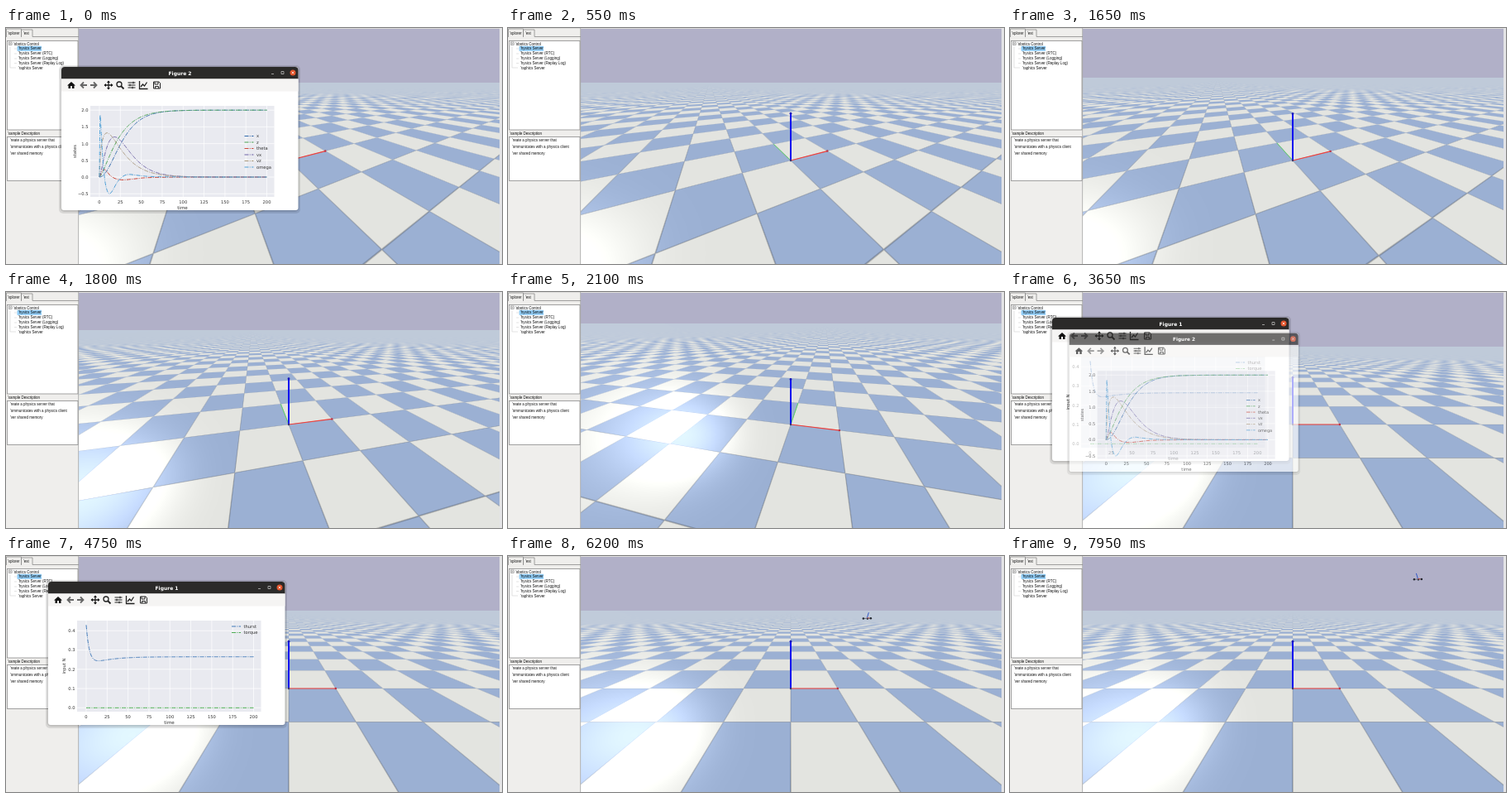
An HTML page with a canvas that plays this animation: 600 px wide and 285 px high, repeating every 8 s.

```html
<!DOCTYPE html>
<html lang="en">
<head>
<meta charset="utf-8">
<title>Drone simulation</title>
<style>
  html, body { margin: 0; width: 100%; height: 100%; overflow: hidden; background: #efeeec; }
  #stage { position: relative; width: 600px; height: 285px; overflow: hidden; }
  canvas, svg { position: absolute; left: 0; top: 0; display: block; }
  .ui { font: 4.5px "Liberation Sans", Arial, sans-serif; fill: #111; }
  .plot { font: 5.2px "DejaVu Sans", sans-serif; fill: #333; }
  .title { font: bold 6px "DejaVu Sans", sans-serif; fill: #fff; text-anchor: middle; }
  .curve { fill: none; stroke-width: 1; stroke-dasharray: 5 1.3 1 1.3; stroke-linejoin: round; }
  .icon { fill: none; stroke: #222; stroke-width: 1.3; }
</style>
</head>
<body>
<div id="stage">
  <canvas id="view" width="600" height="285"></canvas>
  <svg id="overlay" width="600" height="285" viewBox="0 0 600 285"></svg>
</div>
<script>
const LOOP = 8000, STEP = 50;
const ctx = document.getElementById('view').getContext('2d');
const overlay = document.getElementById('overlay');

// ---------- SVG helpers ----------
function add(parent, tag, attrs, text) {
  const node = document.createElementNS('http://www.w3.org/2000/svg', tag);
  for (const key in attrs) node.setAttribute(key, attrs[key]);
  if (text) node.textContent = text;
  parent.appendChild(node);
  return node;
}
const rect = (p, x, y, width, height, fill, more) => add(p, 'rect', { x, y, width, height, fill, ...more });
const label = (p, x, y, text, more) => add(p, 'text', { x, y, ...more }, text);
const path = (p, d, more) => add(p, 'path', { d, ...more });

// ---------- Sidebar ----------
function buildSidebar() {
  const g = add(overlay, 'g', { class: 'ui' });
  const box = { stroke: '#8c8c8c', 'stroke-width': 0.8 };
  rect(g, 0, 0, 88, 285, '#efeeec');
  rect(g, 0, 0, 600, 1, '#dcdbd9');
  rect(g, 597, 0, 3, 285, '#e4e4e6');
  rect(g, 87.3, 0, 0.8, 285, '#a5a5a5');
  path(g, 'M.5 11V1H18.500V11', { fill: 'none', ...box });
  path(g, 'M18.500 10.500V2H32V10.500H88', { fill: 'none', ...box });
  label(g, 2, 7.5, "'xplorer");
  label(g, 21, 8, "'est");
  rect(g, 1.5, 15.500, 85.500, 107.500, '#fff', box);
  rect(g, 1.5, 131.500, 85.500, 53, '#fff', box);
  rect(g, 13.500, 21.800, 29.500, 6, '#8fcbf5');
  path(g, 'M5 23V48H12M10 25H13M10 31H13M10 37H13M10 42.500H13', { stroke: '#c4c4c4', 'stroke-width': 0.5, fill: 'none' });
  rect(g, 3.5, 17, 3.600, 3.600, '#fff', { stroke: '#777', 'stroke-width': 0.6 });
  path(g, 'M4.300 18.800H6.300', { stroke: '#333', 'stroke-width': 0.6 });
  label(g, 9, 20.500, "'obotics Control");
  ['', ' (RTC)', ' (Logging)', ' (Replay Log)'].forEach((s, i) => label(g, 15, 26.400 + i * 5.850, "'hysics Server" + s));
  label(g, 15, 49.700, "'raphics Server");
  label(g, 2, 129.300, "'xample Description");
  ["'reate a physics server that", "'ommunicates with a physics client", "'ver shared memory"]
    .forEach((s, i) => label(g, 5, 136.700 + i * 8, s));
}

// ---------- Plot windows ----------
function spline(points) {
  let d = `M${points[0]}`;
  for (let i = 1; i < points.length - 1; i++) {
    const [x, y] = points[i], [nx, ny] = points[i + 1];
    d += `Q${x} ${y} ${(x + nx) / 2} ${(y + ny) / 2}`;
  }
  return d + `L${points[points.length - 1]}`;
}
const sample = fn => Array.from({ length: 201 }, (_, t) => [t, fn(t)]);
const bump = (peak, at, power) => t => peak * Math.pow(t / at * Math.exp(1 - t / at), power);
function reach(target, speed) {
  let sum = 0;
  const total = sample(speed).reduce((a, p) => a + p[1], 0);
  return sample(t => target * (sum += speed(t)) / total);
}

function toolbar(g) {
  path(g, 'M7 22.500L12 18L17 22.500H15.500V26H13V23H11V26H8.500V22.500Z', { fill: '#111' });
  const arrow = 'M4-.0H-3.500M.0-3.500L-3.500 0L0 3.500';
  path(g, arrow, { class: 'icon', style: 'stroke:#666;stroke-width:1.8', transform: 'translate(27 22)' });
  path(g, arrow, { class: 'icon', style: 'stroke:#666;stroke-width:1.8', transform: 'translate(39 22) scale(-1 1)' });
  path(g, 'M52.500 22H61.500M57 17.500V26.500', { class: 'icon' });
  path(g, 'M57 16.500L59 19H55ZM57 27.500L59 25H55ZM51.500 22L54 20V24ZM62.500 22L60 20V24Z', { fill: '#111' });
  add(g, 'circle', { cx: 70, cy: 21, r: 3, class: 'icon' });
  path(g, 'M72 23L75.500 26.500', { class: 'icon', style: 'stroke-width:1.8' });
  path(g, 'M80.500 19H89.500M80.500 22H89.500M80.500 25H89.500M87 17.800V20.200M83 20.800V23.200M86 23.800V26.200', { class: 'icon', style: 'stroke-width:1.1' });
  path(g, 'M94.500 17V26.500H104.500M96 24L98.500 21L100.500 23L103.500 18.500', { class: 'icon' });
  path(g, 'M111.500 18H118L119.500 19.500V26H111.500ZM113 18V21H117V18M113.500 26V23.500H117.500V26', { class: 'icon', style: 'stroke-width:1' });
}

function plotWindow(o) {
  const g = add(overlay, 'g', {});
  const shadow = { rx: 5, opacity: 0.1 };
  rect(g, -3, -2, 292, 179, '#000', shadow);
  rect(g, -1.5, -1, 289, 176, '#000', shadow);
  rect(g, 0, 0, 286.500, o.height, '#fff', { rx: 3 });
  path(g, 'M0 14.500V4Q0 0 4 0H282.500Q286.500 0 286.500 4V14.500Z', { fill: '#2b2a29' });
  rect(g, 0, 14.500, 286.500, 15, '#f5f4f3');
  label(g, 143.500, 9.500, o.title, { class: 'title' });
  path(g, 'M254 8.500H257M266 5.500H269V8.500H266Z', { stroke: '#ccc', 'stroke-width': 0.7, fill: 'none' });
  add(g, 'circle', { cx: 280, cy: 7, r: 3.500, fill: '#e2542b' });
  path(g, 'M278.700 5.700L281.300 8.300M281.300 5.700L278.700 8.300', { stroke: '#fff', 'stroke-width': 0.7 });
  toolbar(g);

  const plot = add(g, 'g', { class: 'plot' });
  const px = t => 46 + t * 1.0125, py = v => o.zero - v * o.unit;
  const grid = { stroke: '#fff', 'stroke-width': 0.7 };
  rect(plot, 35, 47, 222.500, 110, '#e9eaf0');
  for (let t = 0; t <= 200; t += 25) {
    path(plot, `M${px(t)} 47V157`, grid);
    label(plot, px(t), 165, String(t), { 'text-anchor': 'middle' });
  }
  for (const v of o.ticks) {
    path(plot, `M35 ${py(v)}H257.500`, grid);
    label(plot, 32.500, py(v) + 1.900, v.toFixed(1).replace('-', '\u2212'), { 'text-anchor': 'end' });
  }
  label(plot, 146.500, 171.500, 'time', { 'text-anchor': 'middle', 'font-size': 5.600 });
  label(plot, 0, 0, o.axis, { 'text-anchor': 'middle', transform: `translate(${o.axisX} 102) rotate(-90)` });
  o.series.forEach(([name, stroke, points], i) => {
    path(plot, spline(points.map(([t, v]) => [px(t).toFixed(2), py(v).toFixed(2)].map(Number))), { class: 'curve', stroke });
    const y = o.legendY + i * 7.500;
    path(plot, `M${o.legendX} ${y}h11`, { class: 'curve', stroke });
    label(plot, o.legendX + 14.500, y + 1.900, name);
  });
  return { node: g, x: o.x, y: o.y };
}

buildSidebar();
const vx = bump(1.2, 18, 1.5), vz = bump(1.32, 9, 0.58);
const figure1 = plotWindow({
  x: 51, y: 31, height: 173, title: 'Figure 1', axis: 'input N', axisX: 21,
  zero: 152.300, unit: 232.500, ticks: [0, 0.1, 0.2, 0.3, 0.4], legendX: 222, legendY: 54,
  series: [
    ['thurst', '#3f78b8', sample(t => 0.265 - 0.05 * Math.exp(-t / 22) + 0.215 * Math.exp(-t / 3.8))],
    ['torque', '#4fae55', [[0, 0], [100, 0], [200, 0]]]
  ]
});
const figure2 = plotWindow({
  x: 67, y: 47, height: 173, title: 'Figure 2', axis: 'states', axisX: 17.500,
  zero: 133, unit: 40.400, ticks: [-0.5, 0, 0.5, 1, 1.5, 2], legendX: 221.500, legendY: 83.500,
  series: [
    ['x', '#3068ab', reach(2, vx)],
    ['z', '#4aa352', reach(2, vz)],
    ['theta', '#cc4a3c', [[0, 0], [4, 0.26], [8, 0.2], [14, 0], [25, -0.1], [40, -0.06], [60, 0], [200, 0]]],
    ['vx', '#6d62a6', sample(vx)],
    ['vz', '#a8977a', sample(vz)],
    ['omega', '#4f9fd6', [[0, 0], [0.6, 1.9], [1.2, 1.8], [3, 0.9], [6, -0.1], [10, -0.5], [14, -0.5], [22, -0.1], [32, 0.1], [45, 0.05], [65, 0], [200, 0]]]
  ]
});

function showWindow(win, amount) {
  const k = 0.9 + 0.1 * amount;
  win.node.style.display = amount > 0 ? '' : 'none';
  win.node.setAttribute('opacity', amount);
  win.node.setAttribute('transform', `translate(${win.x + 143 * (1 - k)} ${win.y + 86 * (1 - k)}) scale(${k})`);
}

// ---------- 3D view ----------
const CX = 342, CY = 160, FX = 161.5, FY = 154.4, DIST = 2.84;
const LEFT = 88, WIDTH = 509, HEIGHT = 285;
const LIGHT = [-0.74, 0.42, 0.525];
const SKY = [177, 176, 200], PALE = [227, 228, 224], BLUE = [155, 176, 211];
const clamp = (v, lo = 0, hi = 1) => Math.min(hi, Math.max(lo, v));

// time, yaw, pitch
const POSES = [[1600, 27.5, 31.3], [1650, 25.2, 32.9], [1900, 4, 39], [2100, -11.5, 38.3], [2250, -8, 36.2], [2450, 0, 31.3]];
function cameraAt(time) {
  const t = clamp(time, 1600, 2450);
  let i = 1;
  while (POSES[i][0] < t) i++;
  const a = POSES[i - 1], b = POSES[i], k = (t - a[0]) / (b[0] - a[0]);
  const angle = n => (a[n] + (b[n] - a[n]) * k) * Math.PI / 180;
  const yaw = angle(1), pitch = angle(2);
  return { cy: Math.cos(yaw), sy: Math.sin(yaw), c: Math.cos(pitch), s: Math.sin(pitch), key: yaw + ',' + pitch };
}
function project(cam, x, y, z) {
  const right = x * cam.cy - y * cam.sy, ahead = x * cam.sy + y * cam.cy;
  const depth = DIST + ahead * cam.c - z * cam.s;
  return [CX + FX * right / depth, CY - FY * (ahead * cam.s + z * cam.c) / depth];
}

// Box-filtered square wave and grid line coverage along one axis
const fract = v => v - Math.floor(v);
const wave = (p, w) => 2 * (Math.abs(fract((p - w / 2) / 2) - 0.5) - Math.abs(fract((p + w / 2) / 2) - 0.5)) / w;
const seam = (p, w) => clamp((0.006 + w / 2 - Math.abs(p - Math.round(p))) / w, 0, Math.min(1, 0.012 / w));

const floorImage = ctx.createImageData(WIDTH, HEIGHT);
let floorKey = '';
function renderFloor(cam) {
  if (cam.key === floorKey) return;
  floorKey = cam.key;
  const { c, s, cy, sy } = cam, data = floorImage.data, h = DIST * s;
  const lightR = LIGHT[0] * cy - LIGHT[1] * sy, lightF = LIGHT[0] * sy + LIGHT[1] * cy;
  let n = 0;
  for (let row = 0; row < HEIGHT; row++) {
    const u = (CY - row - 0.5) / FY, drop = s - u * c, run = c + u * s;
    const t = h / drop, dt = t * t * c / h;
    const F = run * t - DIST * c, dF = (s * t + run * dt) / FY;
    for (let col = 0; col < WIDTH; col++, n += 4) {
      data[n + 3] = 255;
      if (drop <= 0.001) {
        for (let k = 0; k < 3; k++) data[n + k] = SKY[k];
        continue;
      }
      const q = (LEFT + col + 0.5 - CX) / FX, R = q * t, dR = q * dt / FY, step = t / FX;
      const X = R * cy + F * sy, Y = F * cy - R * sy;
      const wx = Math.abs(step * cy) + Math.abs(dR * cy + dF * sy);
      const wy = Math.abs(step * sy) + Math.abs(dF * cy - dR * sy);
      const mix = 0.5 - 0.5 * wave(X, wx) * wave(Y, wy);
      const shade = 1 - 0.25 * Math.max(seam(X, wx), seam(Y, wy));
      const facing = (q * lightR + run * lightF + drop * LIGHT[2]) / Math.hypot(q, run, drop);
      const shine = facing > 0 ? 72 * Math.pow(facing, 27) : 0;
      for (let k = 0; k < 3; k++) data[n + k] = (PALE[k] + (BLUE[k] - PALE[k]) * mix) * shade + shine;
    }
  }
}

function line(from, to, color, width) {
  ctx.strokeStyle = color;
  ctx.lineWidth = width;
  ctx.beginPath();
  ctx.moveTo(...from);
  ctx.lineTo(...to);
  ctx.stroke();
}
function dot([x, y], r, color) {
  ctx.fillStyle = color;
  ctx.beginPath();
  ctx.arc(x, y, r, 0, 7);
  ctx.fill();
}

const approach = (t, slow, fast) => 1 - (fast * Math.exp(-slow * t) - slow * Math.exp(-fast * t)) / (fast - slow);
function drawDrone(cam, time) {
  const t = (time - 4850) / STEP;
  if (t < 0) return;
  const [x, y] = project(cam, 1.85 * approach(t, 0.053, 0.17), 0, 2 * approach(t, 0.046, 0.6));
  const lean = 2 - 4 * clamp((t - 27) / 25);
  line([x - 5, y + 0.8], [x + 5, y + 0.4], '#55585f', 0.8);
  line([x, y], [x + lean, y - 6.5], '#2f55c8', 1);
  line([x, y], [x + 3, y + 0.4], '#c4423c', 0.9);
  dot([x - 4.5, y + 0.8], 1.2, '#20242c');
  dot([x + 4.5, y + 0.6], 1.2, '#20242c');
  dot([x + 0.5, y + 1.2], 1, '#30343c');
}

function drawScene(time) {
  const cam = cameraAt(time), origin = project(cam, 0, 0, 0);
  renderFloor(cam);
  ctx.putImageData(floorImage, LEFT, 0);
  const xTip = project(cam, 1, 0, 0), zTip = project(cam, 0, 0, 1);
  line(origin, project(cam, 0, 1, 0), '#5fd46a', 1);
  line(origin, xTip, '#f0403c', 1.2);
  line(origin, zTip, '#0a0af0', 2);
  dot(xTip, 1.2, '#c03040');
  dot(zTip, 1.4, '#1616b8');
  dot(origin, 1.2, '#3a3a70');
  drawDrone(cam, time);
}

// ---------- Timeline ----------
const ramp = (time, start, length) => clamp((time - start) / length);
let shown = -1;
function tick(now) {
  const time = Math.floor(now % LOOP / STEP) * STEP;
  if (time !== shown) {
    shown = time;
    drawScene(time);
    showWindow(figure1, ramp(time, 3450, 150) - ramp(time, 4750, 150));
    showWindow(figure2, 1 - ramp(time, 350, 150) + ramp(time, 3550, 150) - ramp(time, 4400, 150));
  }
  requestAnimationFrame(tick);
}
tick(performance.now());
</script>
</body>
</html>
```
